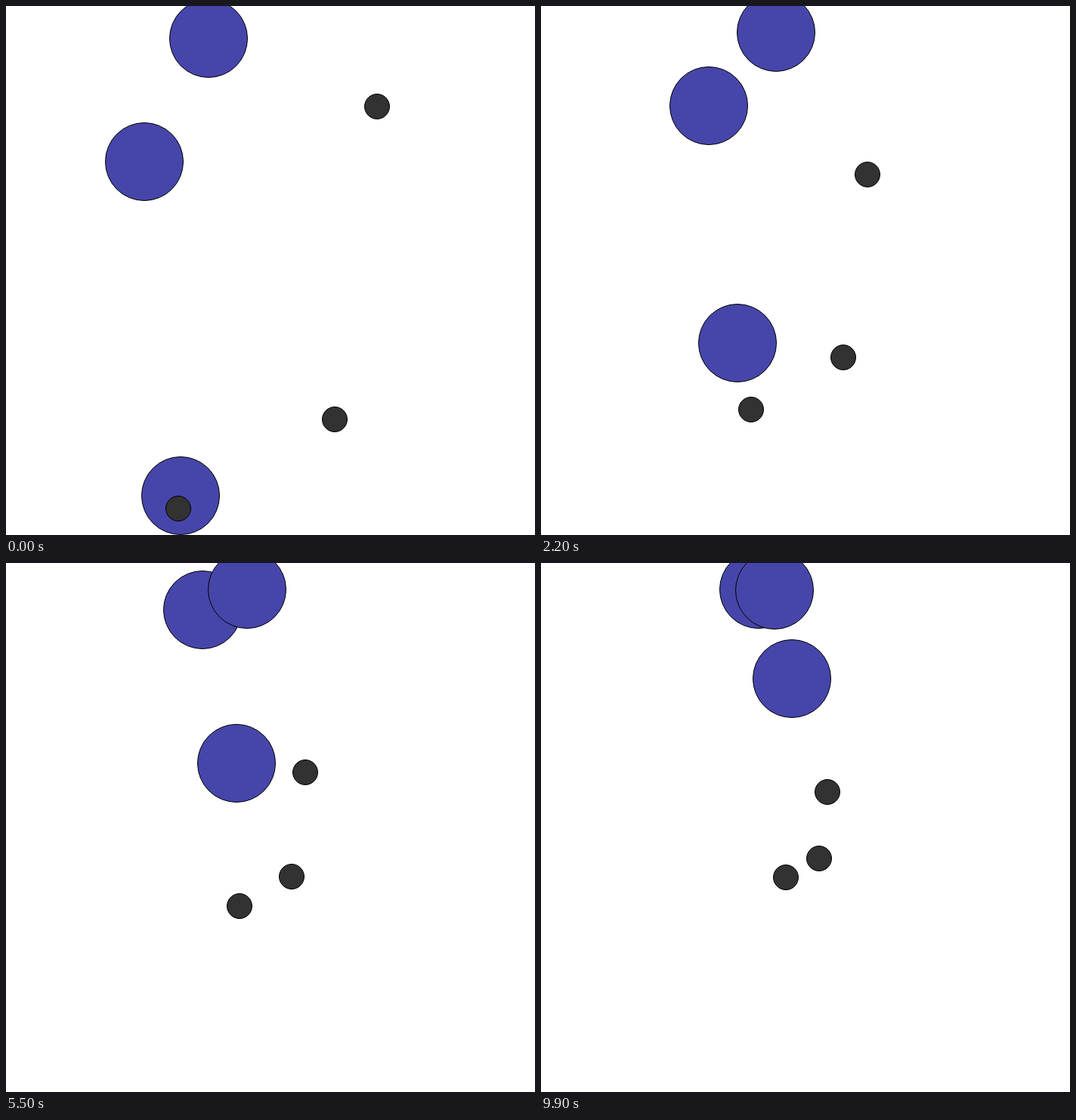
Animation, 700 px wide and 700 px high, one loop 10 s. Source, as an HTML page with a canvas:

```html
<!DOCTYPE html>
<html>
<head>
<meta charset="utf-8">
<style>
html, body { margin: 0; width: 100%; height: 100%; overflow: hidden; background: #fff; }
canvas { display: block; }
</style>
</head>
<body>
<canvas id="stage" width="700" height="700"></canvas>
<script>
const ctx = document.getElementById('stage').getContext('2d');
const STEP = 100, STEPS = 100;

// Small dots: start point and the point they shrink towards
const dots = [
  { from: [491, 133], to: [350, 348.3] },
  { from: [435, 547], to: [350, 350.3] },
  { from: [228, 665], to: [348.8, 350.3] }
];

// Large discs: [step, value] keys per axis, back to front
const discs = [
  {
    x: [[0, 183], [1, 181], [11, 202], [14, 208], [22, 222], [33, 238], [44, 250], [55, 260],
        [66, 269], [77, 277], [88, 283], [99, 288]],
    y: [[0, 206], [14, 156], [30, 111], [45, 79], [55, 62], [72, 44], [86, 36.5], [99, 35]]
  },
  {
    x: [[0, 268], [14, 299], [30, 319], [45, 321], [55, 319], [72, 314], [99, 309]],
    y: [[0, 43], [5, 35], [14, 35], [72, 35], [99, 36]]
  },
  {
    x: [[0, 231], [14, 249], [30, 271], [45, 292], [55, 305], [72, 323], [99, 332]],
    y: [[0, 648], [14, 511], [30, 391], [45, 310], [55, 265], [72, 206], [99, 153]]
  }
];

const chord = (a, b) => (b[1] - a[1]) / (b[0] - a[0]);

// Slope at key i, zero at turning points so the curve never overshoots
function slope(keys, i) {
  const last = keys.length - 1;
  if (i === 0) return chord(keys[0], keys[1]);
  if (i === last) return chord(keys[last - 1], keys[last]);
  const l = chord(keys[i - 1], keys[i]), r = chord(keys[i], keys[i + 1]);
  if (l * r <= 0) return 0;
  const hl = keys[i][0] - keys[i - 1][0], hr = keys[i + 1][0] - keys[i][0];
  return (l * hr + r * hl) / (hl + hr);
}

function curve(keys, n) {
  let i = 0;
  while (i < keys.length - 2 && n > keys[i + 1][0]) i++;
  const [a, p] = keys[i], [b, q] = keys[i + 1];
  const h = b - a, u = (n - a) / h, v = 1 - u;
  return p * v * v * (1 + 2 * u) + q * u * u * (3 - 2 * u)
    + h * u * v * (v * slope(keys, i) - u * slope(keys, i + 1));
}

// Steady speed at first, then slowing with distance
const spread = n => n < 12 ? 1 - 0.02 * n : 1 / (0.836 + 0.04 * n);

function circle(x, y, r, fill) {
  ctx.beginPath();
  ctx.arc(Math.round(x), Math.round(y), r, 0, 2 * Math.PI);
  ctx.fillStyle = fill;
  ctx.fill();
  ctx.stroke();
}

function draw(now) {
  const n = Math.floor(now / STEP) % STEPS;
  const s = spread(n);
  ctx.fillStyle = '#fff';
  ctx.fillRect(0, 0, 700, 700);
  ctx.strokeStyle = '#000';
  ctx.lineWidth = 1;
  for (const d of discs) circle(curve(d.x, n), curve(d.y, n), 51.5, '#4646aa');
  for (const { from, to } of dots) {
    const [x, y] = to.map((c, k) => c + (from[k] - c) * s);
    circle(x, y, 16.5, '#323232');
  }
}

const start = performance.now();
function tick() {
  draw(performance.now() - start);
  requestAnimationFrame(tick);
}
tick();
</script>
</body>
</html>
```
